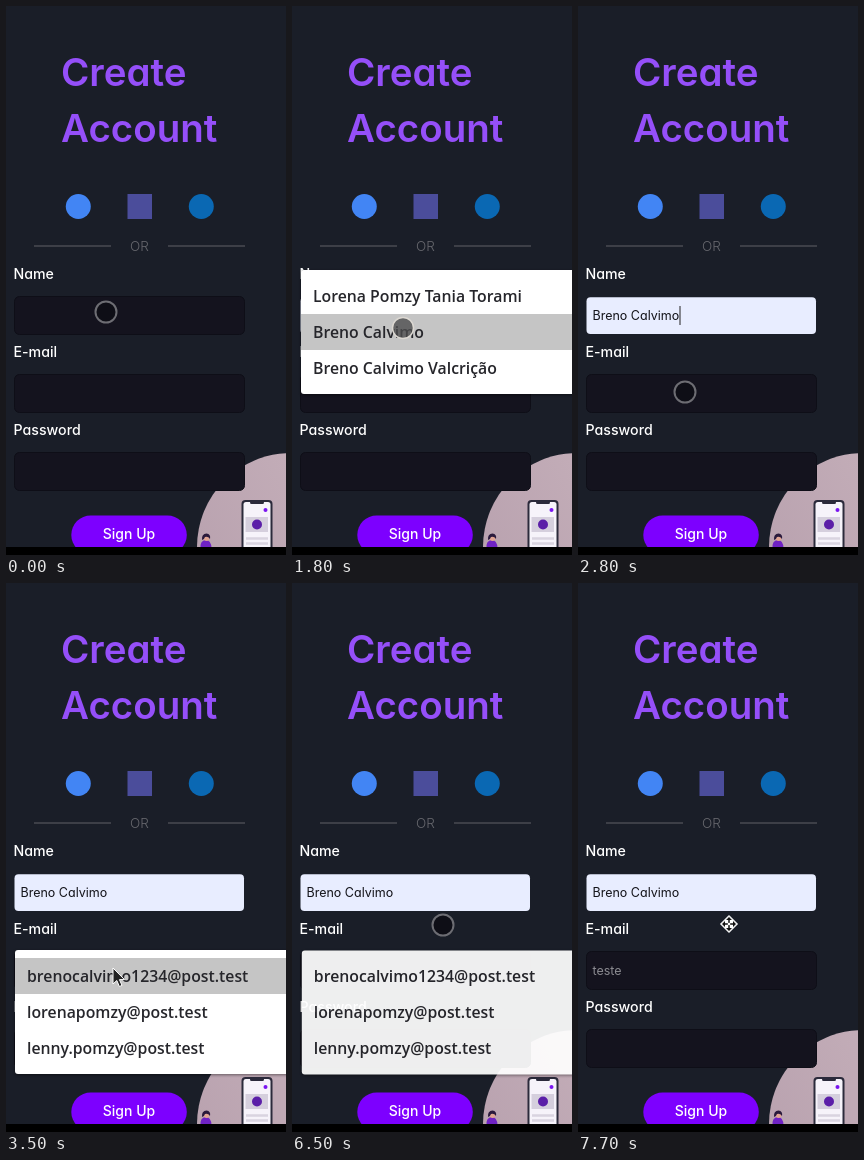
An HTML page for the animation above (8 s loop, 280 by 549 pixels).

```html
<!DOCTYPE html>
<html lang="pt">
<head>
<meta charset="utf-8">
<title>Create Account</title>
<style>
  html, body { margin: 0; width: 100%; height: 100%; overflow: hidden; background: #1a1e28; }
  svg {
    display: block; width: 280px; height: 549px;
    font-family: Inter, "Open Sans", sans-serif;
    font-feature-settings: "cv11"; /* round, single-storey a */
  }
  .title { font-size: 38.5px; font-weight: 600; fill: #954ff9; }
  .label { font-size: 14.2px; font-weight: 500; fill: #fff; }
  .value { font-size: 12.5px; }
  .field { fill: #14131e; stroke: #0e0e17; }
  .item { font: 600 15.8px "Open Sans", "Noto Sans", sans-serif; fill: #26262b; }
  .panel { filter: drop-shadow(0 1px 1.5px #0007); }
</style>
</head>
<body>
<svg viewBox="0 0 280 549">
  <defs>
    <linearGradient id="blush" x1="0" y1="0.6" x2="0.6" y2="0.3">
      <stop offset="0" stop-color="#b9a2af"/>
      <stop offset="1" stop-color="#c2acb7"/>
    </linearGradient>
  </defs>
  <rect width="280" height="549" fill="#1a1e28"/>

  <text class="title" x="55" y="80.3">Create</text>
  <text class="title" x="55" y="136.3">Account</text>

  <circle cx="72.3" cy="200.5" r="12.5" fill="#4285f4"/>
  <rect x="121.5" y="188" width="24.5" height="25" fill="#4b4d9b"/>
  <circle cx="195.3" cy="200.5" r="12.5" fill="#0a68b3"/>

  <path d="M28 240H105M162 240H239" stroke="#494b52" stroke-width="1.5"/>
  <text x="133.5" y="245" text-anchor="middle" font-size="13.5" font-weight="300" fill="#66676d">OR</text>

  <!-- illustration -->
  <circle cx="285" cy="541" r="94" fill="url(#blush)"/>
  <g>
    <rect x="235.5" y="494" width="31" height="60" rx="4" fill="#2b2a3b"/>
    <rect x="237.5" y="496" width="27" height="58" rx="2.5" fill="#f6f3fa"/>
    <rect x="244" y="495" width="14" height="3" rx="1.5" fill="#2b2a3b"/>
    <circle cx="259.5" cy="504" r="2" fill="#7a14f0"/>
    <rect x="239.5" y="511" width="22.5" height="15" fill="#d5cfdd"/>
    <circle cx="251" cy="518.5" r="5" fill="#5b1fa8"/>
    <path d="M240 532.5H262M240 537.5H262" stroke="#d9d4e0" stroke-width="2.5"/>
  </g>
  <g>
    <path d="M194.5 542Q194 535 199 534Q205 533.5 205.5 542Z" fill="#6f22c4"/>
    <circle cx="200.5" cy="532" r="3" fill="#e0a493"/>
    <path d="M196 534Q195.5 527.5 200.5 527.5Q205 528 204 533Q202 530 199 531Q198 534 196 534Z" fill="#2a1a3c"/>
  </g>

  <text class="label" x="7.5" y="273">Name</text>
  <text class="label" x="7.5" y="351">E-mail</text>
  <text class="label" x="7.5" y="429">Password</text>
  <rect id="empty" class="field" x="8.5" y="290.5" width="230" height="38" rx="5"/>
  <rect class="field" x="8.5" y="368.5" width="230" height="38" rx="5"/>
  <rect class="field" x="8.5" y="446.5" width="230" height="38" rx="5"/>

  <g id="filled">
    <rect x="8.5" y="291.3" width="229.5" height="36.7" rx="4" fill="#e8edff"/>
    <text class="value" x="14.5" y="314" fill="#14141a">Breno Calvimo</text>
  </g>
  <text id="typed" class="value" x="14.5" y="392" fill="#8c8c92"></text>
  <rect id="caret" width="1" height="19"/>

  <rect x="65.3" y="509.4" width="115.5" height="39" rx="19.5" fill="#7d00ff"/>
  <text x="123" y="533" text-anchor="middle" font-size="14" font-weight="450" fill="#fff">Sign Up</text>
  <rect y="541" width="280" height="8" fill="#000"/>

  <g id="names"></g>
  <g id="mails"></g>

  <g id="cursor">
    <circle id="ring" r="10.5" fill="#0e0e16" stroke="#6d6d73" stroke-width="2"/>
    <circle id="press" r="10.5" fill="#4c4c4e" fill-opacity=".8" stroke="#dcd8d2" stroke-width="1.5"/>
    <path id="arrow" d="M0 0V16L3.8 12.5L6.4 18.5L9 17.4L6.4 11.6H11.5Z" fill="#222" stroke="#fff"/>
    <g id="move">
      <path d="M0 -8.5L8.5 0L0 8.5L-8.5 0Z" fill="#fff" stroke="#fff" stroke-linejoin="round"/>
      <path d="M0 -7L3 -4H-3ZM0 7L3 4H-3ZM-7 0L-4 -3V3ZM7 0L4 -3V3Z" fill="#111"/>
      <path d="M0 -4V4M-4 0H4" stroke="#111" stroke-width="1.5"/>
      <circle r="1.3" fill="#fff"/>
    </g>
  </g>
</svg>
<script>
const LOOP = 8000, ROW = 36;
const $ = id => document.getElementById(id);

const lists = {
  names: { y: 264, items: ['Lorena Pomzy Tania Torami', 'Breno Calvimo', 'Breno Calvimo Valcrição'] },
  mails: { y: 367, items: ['brenocalvimo1234@post.test', 'lorenapomzy@post.test', 'lenny.pomzy@post.test'] }
};

for (const [id, { y, items }] of Object.entries(lists)) {
  const rows = items.map((s, i) =>
    `<text class="item" x="21" y="${y + 31.7 + i * ROW}">${s}</text>`).join('');
  $(id).innerHTML = `<rect class="panel" x="9" y="${y}" width="280" height="124" rx="3" fill="#fff"/>
    <rect class="hover" x="9" width="280" height="${ROW}" fill="#c5c5c5"/>${rows}`;
}

// Each row: start time, then the values held until the next row.
const cursorSteps = [
  [0, 'ring', 100, 306], [600, 'arrow', 100, 306],
  [1300, 'arrow', 106, 318], [1400, 'arrow', 111, 322],
  [1800, 'press', 111, 322], [1900, 'press', 113, 326], [2000, 'ring', 119, 336],
  [2100, 'ring', 125, 344], [2200, 'ring', 125, 352], [2300, 'ring', 124, 357],
  [2500, 'ring', 121, 364], [2600, 'ring', 116, 373], [2700, 'ring', 110, 381],
  [2800, 'ring', 107, 386], [3500, 'arrow', 107, 385],
  [4000, 'ring', 115, 361], [4200, 'ring', 139, 338], [4300, 'ring', 151, 342],
  [7700, 'move', 151, 341]
];
// opacity, hovered row
const nameSteps = [
  [0, 0, -1], [600, 1, 0], [1300, 1, 1], [1900, .6, 1], [2000, .2, 1], [2100, 0, -1]
];
const mailSteps = [
  [0, 0, -1], [3500, 1, 0], [4000, 1, -1], [6500, .93, -1], [6600, .45, -1], [6700, 0, -1]
];
// x, y, colour
const caretSteps = [
  [0, 0, 0, 'none'], [2000, 101.5, 300, '#222'], [2500, 0, 0, 'none'],
  [2800, 101.5, 300, '#222'], [3500, 0, 0, 'none'],
  [6700, 33, 378, '#ddd'], [6900, 38, 378, '#ddd'], [7500, 46, 378, '#ddd'], [7700, 0, 0, 'none']
];
const typedSteps = [[0, ''], [6700, 'tes'], [6900, 'test'], [7500, 'teste']];

const at = (steps, t) => steps.findLast(s => s[0] <= t).slice(1);
const show = (el, on) => el.setAttribute('display', on ? 'inline' : 'none');

function drawList(id, steps, t) {
  const [alpha, row] = at(steps, t), el = $(id), hover = el.querySelector('.hover');
  show(el, alpha > 0);
  el.setAttribute('opacity', alpha);
  el.setAttribute('transform', alpha < 1 ? 'translate(.8 .5)' : '');
  show(hover, row >= 0);
  hover.setAttribute('y', lists[id].y + 8 + Math.max(row, 0) * ROW);
}

function draw(t) {
  const [kind, x, y] = at(cursorSteps, t);
  $('cursor').setAttribute('transform', `translate(${x} ${y})`);
  for (const k of ['ring', 'press', 'arrow', 'move']) show($(k), k === kind);

  drawList('names', nameSteps, t);
  drawList('mails', mailSteps, t);
  show($('filled'), t >= 1800);
  show($('empty'), t < 1800);

  const [cx, cy, colour] = at(caretSteps, t), caret = $('caret');
  caret.setAttribute('x', cx);
  caret.setAttribute('y', cy);
  caret.setAttribute('fill', colour);
  $('typed').textContent = at(typedSteps, t)[0];
}

const start = performance.now();
function tick() {
  draw((performance.now() - start) % LOOP);
  requestAnimationFrame(tick);
}
tick();
</script>
</body>
</html>
```
